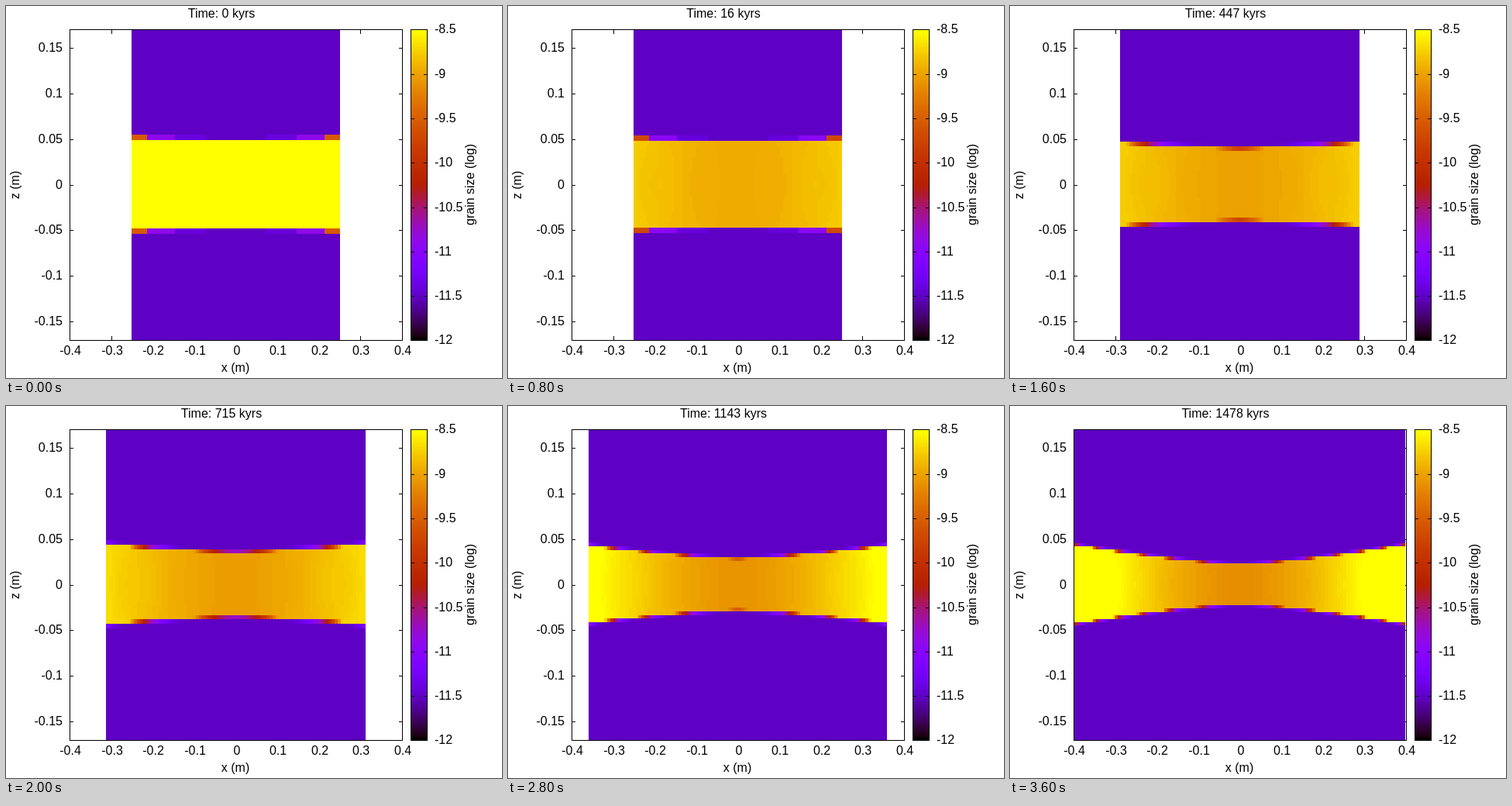
An HTML page for the animation above (4000 ms loop, 640x480 px).

```html
<!DOCTYPE html>
<html lang="en">
<head>
<meta charset="utf-8">
<title>Grain size over time</title>
<style>
  html, body { margin: 0; width: 100%; height: 100%; overflow: hidden; background: #fff; }
  svg { display: block; width: 640px; height: 480px; }
  text { font: 16px "Liberation Sans", Arial, sans-serif; fill: #000; }
  .crisp { shape-rendering: crispEdges; }
</style>
</head>
<body>
<svg viewBox="0 0 640 480">
  <rect width="640" height="480" fill="#fff"/>
  <g id="axes" class="crisp"></g>
  <g class="crisp">
    <g id="matrix"></g>
    <g id="quarter"></g>
    <use href="#quarter" transform="matrix(-1 0 0 1 593 0)"/>
    <use href="#quarter" transform="matrix(1 0 0 -1 0 460)"/>
    <use href="#quarter" transform="matrix(-1 0 0 -1 593 460)"/>
  </g>
  <g id="scale" class="crisp"></g>
  <path class="crisp" d="M82.5 30.5H511.5V431.5H82.5ZM522.5 30.5H543.5V431.5H522.5Z" fill="none" stroke="#000"/>
  <g id="labels"></g>
  <text id="title" x="278" y="15" text-anchor="middle"></text>
</svg>
<script>
const STEP = 400;
const KYRS = [0, 2, 16, 137, 447, 715, 943, 1143, 1318, 1478];
const STRAIN_RATE = 3.13e-4;      // per kyr
const MID_X = 296.5, MID_Y = 230.35;
const HALF_WIDTH = 134.3, CELL_H = 7.125, COLUMN = 4;
const MATRIX = 0.1392;            // palette level of the surroundings

const el = id => document.getElementById(id);
const clamp = v => Math.min(1, Math.max(0, v));

function color(level) {
  const v = clamp(level);
  const rgb = [Math.sqrt(v), v ** 3, clamp(Math.sin(2 * Math.PI * v))];
  return `rgb(${rgb.map(c => Math.round(c * 255))})`;
}

const rect = (x0, y0, x1, y1, level) =>
  `<rect x="${x0}" y="${y0}" width="${x1 - x0}" height="${y1 - y0}" fill="${color(level)}"/>`;

const label = (x, y, content, anchor) =>
  `<text x="${x}" y="${y}" text-anchor="${anchor}">${content}</text>`;

const upright = (x, y, content) =>
  `<g transform="translate(${x} ${y}) rotate(-90)">${label(0, 0, content, "middle")}</g>`;

function drawStatic() {
  let ticks = "", texts = "", bar = "", barTicks = "";
  for (let i = 0; i <= 8; i++) {
    const x = Math.floor(82.5 + i * 53.625) + .5;
    ticks += `M${x} 431v-5M${x} 31v5`;
    texts += label(x + .5, 450, +((i - 4) / 10).toFixed(1), "middle");
  }
  for (let i = -3; i <= 3; i++) {
    const y = Math.floor(231 - i * 58.97) + .5;
    ticks += `M83 ${y}h4M511 ${y}h-4`;
    texts += label(73, y + 4.5, i / 20, "end");
  }
  for (let i = 0; i < 128; i++) {
    bar += rect(523, 431 - (i + 1) * 400 / 128, 543, 431 - i * 400 / 128, i / 127);
  }
  for (let i = 0; i <= 7; i++) {
    const y = Math.round(30.4 + i * 57.286) + .5;
    barTicks += `M523 ${y}h4M543 ${y}h-4`;
    texts += label(553, y + 4, -8.5 - i / 2, "start");
  }
  texts += label(296, 472, "x (m)", "middle");
  texts += upright(17, 231, "z (m)") + upright(604, 230.5, "grain size (log)");
  el("axes").innerHTML = `<path d="${ticks}" stroke="#000"/>`;
  el("scale").innerHTML = bar + `<path d="${barTicks}" stroke="#000"/>`;
  el("labels").innerHTML = texts;
}

// Half thickness of the layer in cells; u runs from 0 (middle) to 1 (end)
function thickness(strain, u) {
  const neck = strain ** 2.2;
  return 8 - 10.35 * neck + (.85 + 26.5 * neck) * u ** 1.4;
}

// Coarser towards the ends, with faint lens-shaped bands
function layerLevel(strain, u, z) {
  if (strain < .002) return 1;
  const base = .875 - .12 * strain + (.055 + 1.1 * strain ** 2) * u ** 1.6;
  const lens = .008 * u * Math.cos(14 * (u - .65)) * Math.cos(2 * z);
  return Math.round((base + lens) * 128) / 128;
}

function drawLayer(strain, left) {
  const half = HALF_WIDTH * Math.exp(strain), h = CELL_H * Math.exp(-strain);
  const coarse = strain < .02 ? .285 : COLUMN / half;  // the edge starts on a coarse mesh
  const row = n => Math.round(MID_Y - n * h);
  let out = "";
  for (let x = left; x < MID_X; x += COLUMN) {
    const x1 = Math.min(x + COLUMN, 297);
    const u = clamp((MID_X - (x + x1) / 2) / half);
    const cells = thickness(strain, (Math.floor(u / coarse) + .5) * coarse);
    const full = Math.floor(cells), part = cells - full;
    for (let n = 0; n < full; n++) {
      out += rect(x, row(n + 1), x1, row(n), layerLevel(strain, u, (n + .5) / cells));
    }
    const mixed = MATRIX + (layerLevel(strain, u, 1) - MATRIX) * part ** 2.5;
    out += rect(x, row(full + 1), x1, row(full), mixed);
  }
  return out;
}

function draw(step) {
  const strain = STRAIN_RATE * KYRS[step];
  const left = Math.round(MID_X - HALF_WIDTH * Math.exp(strain));
  el("matrix").innerHTML = rect(left, 30, 593 - left, 431, MATRIX);
  el("quarter").innerHTML = drawLayer(strain, left);
  el("title").textContent = `Time: ${KYRS[step]} kyrs`;
}

let shown = -1;
const begin = performance.now();
function tick() {
  const step = Math.floor((performance.now() - begin) / STEP) % KYRS.length;
  if (step !== shown) draw(shown = step);
  requestAnimationFrame(tick);
}

drawStatic();
tick();
</script>
</body>
</html>
```
